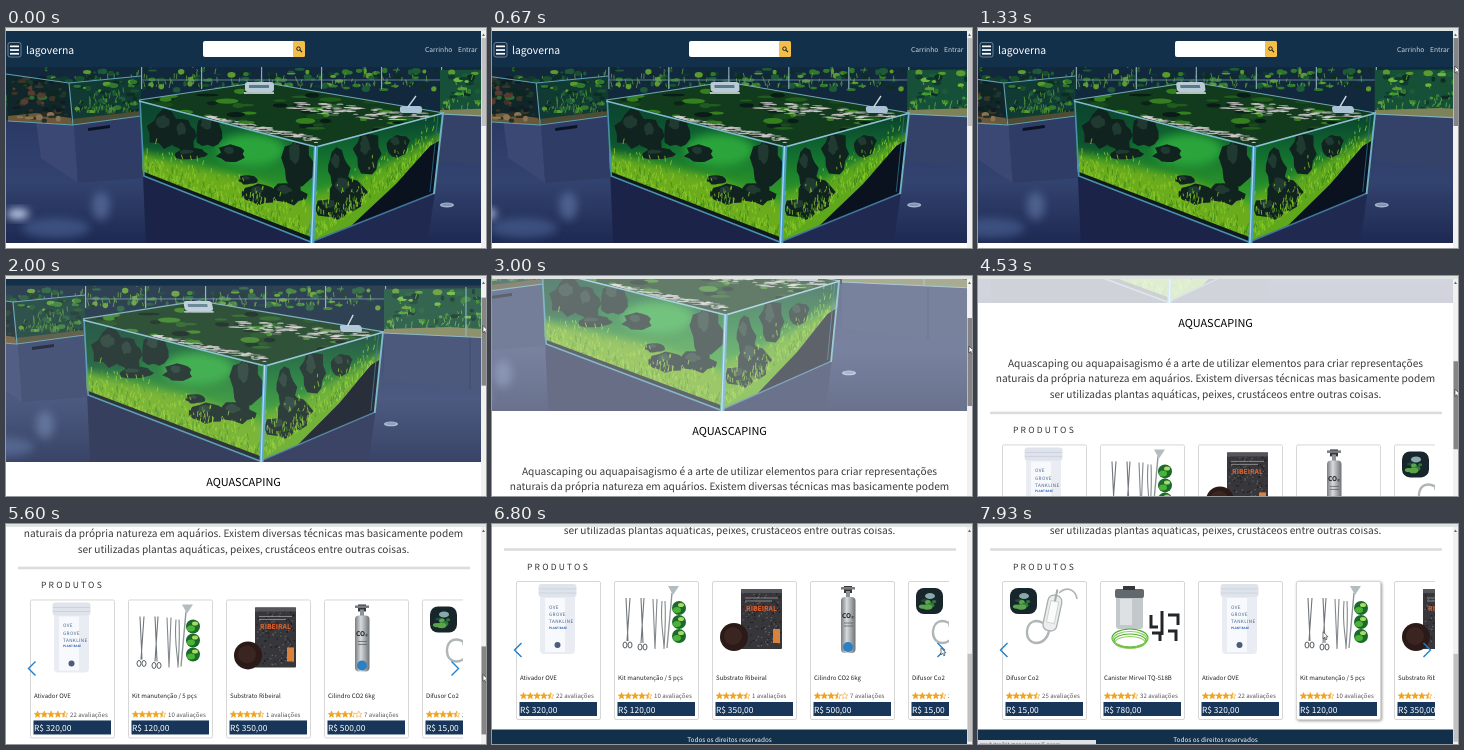
Write an HTML page that moves like this. It is 480 px wide and 220 px high and loops after 8 s.

```html
<!DOCTYPE html>
<html lang="pt">
<head>
<meta charset="utf-8">
<title>lagoverna</title>
<style>
html, body { margin: 0; width: 100%; height: 100%; overflow: hidden; background: #fff; }
svg { display: block; }
text { font-family: "Noto Sans CJK JP", "Noto Sans CJK SC", "Noto Sans CJK", sans-serif; text-rendering: geometricPrecision; white-space: pre; }
</style>
</head>
<body>
<svg id="stage" width="480" height="220" viewBox="0 0 480 220"></svg>
<script>
const LOOP = 8000;
let seed = 11;
const rnd = (a = 0, b = 1) => {
  seed = (seed * 16807) % 2147483647;
  return a + (b - a) * seed / 2147483647;
};
const many = (n, make) => Array.from({ length: n }, (_, i) => make(i)).join('');

// Markup helpers
const rect = (x, y, w, h, fill, more = '') => `<rect x="${x}" y="${y}" width="${w}" height="${h}" fill="${fill}" ${more}/>`;
const oval = (x, y, rx, ry, fill, more = '') => `<ellipse cx="${x}" cy="${y}" rx="${rx}" ry="${ry}" fill="${fill}" ${more}/>`;
const poly = (points, fill, more = '') => `<polygon points="${points}" fill="${fill}" ${more}/>`;
const line = (d, stroke, width = 1, more = '') => `<path d="${d}" fill="none" stroke="${stroke}" stroke-width="${width}" ${more}/>`;
const text = (x, y, size, fill, str, more = '') => `<text x="${x}" y="${y}" font-size="${size}" fill="${fill}" ${more}>${str}</text>`;
const centered = 'text-anchor="middle"';
const gradient = (id, ...colors) => `<linearGradient id="${id}" x2="0" y2="1">${colors.map((c, i) =>
  `<stop offset="${i / (colors.length - 1)}" stop-color="${c}"/>`).join('')}</linearGradient>`;
const clip = (id, shape) => `<clipPath id="${id}">${shape}</clipPath>`;

// Aquarium scenery
const rock = (x, y, w, h) => {
  const ring = (k, dx, dy) => Array.from({ length: 15 }, (_, i) => {
    const a = i / 15 * 2 * Math.PI, r = rnd(.36, .56) * k;
    return `${(x + dx + Math.cos(a) * w * r).toFixed(1)},${(y + dy + Math.sin(a) * h * r).toFixed(1)}`;
  }).join(' ');
  return poly(ring(1.05, 0, 0), '#10231f') + poly(ring(.4, -w * .1, -h * .2), '#2c4a3e', 'opacity=".6"');
};
const leaves = (n, x0, x1, y0, y1, colors, stretch = 1) => many(n, () =>
  oval(rnd(x0, x1).toFixed(1), rnd(y0, y1).toFixed(1), (rnd(1.5, 5) * stretch).toFixed(1), rnd(1, 3).toFixed(1), colors[Math.floor(rnd(0, colors.length))]));
const grass = (n, x0, x1, floor, depth, color) => {
  const d = many(n, () => {
    const x = rnd(x0, x1);
    return `M${x.toFixed(1)} ${(floor(x) - rnd() * rnd(0, depth)).toFixed(1)}l${rnd(-1.5, 1.5).toFixed(1)} ${rnd(-6, -2).toFixed(1)}`;
  });
  return line(d, color, .8);
};
const flecks = (n, x0, x1, y0, slope, spread) => many(n, () => {
  const x = rnd(x0, x1), y = y0 + (x - x0) * slope + rnd(-spread, spread);
  return oval(x.toFixed(1), y.toFixed(1), rnd(2, 7).toFixed(1), rnd(.3, .8).toFixed(1), '#ddd3d6', 'opacity=".8"');
});
const greens = ['#17502a', '#2f7a2a', '#5c9a30', '#0d2c22', '#1d5a38', '#0f3a30'];
const darks = ['#101c22', '#1b3a2a', '#0c2620', '#3a3524'];

const LEFT = '133,72 310,118 305,214 137,148';
const RIGHT = '310,118 438,85 429,165 305,214';
const TOP = '133,72 255,54 438,85 310,118';

const room = () =>
  rect(-60, 39, 760, 60, '#12283c') +
  rect(-60, 88, 760, 130, 'url(#floor)') +
  leaves(150, 40, 440, 41, 62, greens) +
  grass(120, 60, 440, () => 60, 22, '#5f9f3a') +
  many(6, i => rect(135 + i * 60, 39, 1.2, 22, '#86aab6')) +
  line('M120 52H440', '#6f97a4', .8) +
  poly('-60,62 28,66 30,92 -60,92', '#16323a') + leaves(30, -55, 24, 64, 86, greens) +
  poly('30,93 68,97 72,155 35,130', '#3a4873') +
  poly('68,97 135,88 137,150 72,155', '#2f3c66') +
  poly('82,100 104,97 104,100 82,103', '#0c1226') +
  poly('0,46 63,55 67,97 2,93', '#10262a') +
  leaves(50, 4, 58, 50, 86, darks) + leaves(10, 8, 56, 56, 76, ['#5a3b30', '#2f6a30']) +
  poly('2,88 30,85 65,90 67,97 2,93', '#6b5838') +
  leaves(12, 8, 60, 86, 93, ['#2b2a26', '#8a7452', '#222f2a']) +
  poly('63,55 135,48 135,88 67,97', '#123a34') +
  leaves(55, 70, 132, 53, 84, greens) + grass(60, 70, 134, () => 86, 26, '#4f9434') +
  poly('66,91 135,83 135,88 67,97', '#4d4c35') +
  line('M0 46L63 55L135 48M63 55L67 97L135 88M67 97L2 93', '#5fa0b4', 1.1) +
  oval(12, 186, 11, 5, '#c9d8f6', 'filter="url(#soft)"') + oval(95, 178, 9, 14, '#7188b8', 'opacity=".5" filter="url(#soft)"') +
  oval(50, 200, 34, 10, '#5570a6', 'opacity=".5" filter="url(#soft)"') +
  poly('434,86 690,98 690,162 434,133', '#34426a') +
  line('M520 90V143M600 94V151', '#26325a') +
  poly('434,42 690,40 690,98 434,86', '#175038') +
  leaves(140, 438, 680, 44, 84, [...greens, '#3f9a2e', '#6cb53a']) +
  grass(180, 438, 680, () => 84, 36, '#63b03a') +
  poly('434,82 500,80 690,92 690,98 434,86', '#7d8258') +
  line('M434 86L690 98M516 40V89', '#7fb0c0', 1.1) +
  oval(441, 177, 7, 2.4, '#a5b4d0') + oval(441, 176.7, 5, 1.3, '#8491b0');

const leftFloor = x => 148 + (x - 137) * .393;
const leftFace = () =>
  poly('137,147 305,213 305,217 140,217', '#1b2448') +
  `<g clip-path="url(#leftClip)">` + poly(LEFT, 'url(#water)') +
  oval(245, 122, 34, 16, '#2aa53a', 'filter="url(#soft)"') +
  poly('120,70 190,88 186,124 120,125', '#0c4432', 'opacity=".6" filter="url(#soft)"') +
  poly('120,122 180,136 240,150 320,182 320,240 120,160', '#6aac1c', 'filter="url(#soft)"') +
  rock(160, 102, 36, 38) + rock(178, 108, 26, 34) + rock(203, 103, 28, 36) + rock(184, 126, 34, 12) +
  rock(226, 126, 28, 18) + rock(292, 136, 30, 54) + rock(282, 166, 36, 22) + rock(254, 166, 34, 20) + rock(242, 152, 18, 10) +
  grass(300, 136, 308, leftFloor, 42, '#8cc82a') + grass(130, 136, 308, leftFloor, 34, '#3f8a1c') +
  poly('133,142 305,209 305,214 137,148', '#0f1a1e') + `</g>` +
  line('M134 72L138 148L305 214', '#4a8fae', 1.6) + line('M133 73L310 119', '#7fbccb', 1.6);

const rightFloor = x => 214 - (x - 305) * .7;
const rightFace = () =>
  poly('305,213 429,164 421,217 305,217', '#202a50') +
  `<g clip-path="url(#rightClip)">` + poly(RIGHT, 'url(#water)') +
  poly('295,172 350,152 440,104 440,170 300,225', '#5fa81c', 'filter="url(#soft)"') +
  rock(362, 126, 28, 46) + rock(332, 140, 24, 36) + rock(340, 164, 40, 36) + rock(326, 180, 30, 22) + rock(392, 118, 24, 24) +
  grass(200, 308, 434, rightFloor, 46, '#8ccb2c') + grass(80, 308, 434, rightFloor, 40, '#3a841e') +
  poly('300,218 345,198 390,156 424,118 445,106 440,170', '#0a1220') + `</g>` +
  line('M305 214L429 165', '#41759a', 1.4) + line('M310 119L438 85', '#8cc4d2', 1.6) +
  line('M437 85L428 166', '#6fb0c8', 2) + line('M432 88L424 164', '#2f6d8c', .8) +
  line('M310 118L306 216', '#4a9cc4', 4.5) + line('M309.500 118L305.500 216', '#a9d8e8', 1.3);

const topFace = () =>
  `<g clip-path="url(#topClip)">` + poly(TOP, '#123a1c') +
  leaves(70, 150, 400, 58, 104, ['#205c1e', '#0c2418', '#34801f', '#0a1c18', '#184a1c'], 2.4) +
  flecks(95, 285, 425, 77, .1, 6) + flecks(80, 200, 315, 90, .2, 3) + `</g>` +
  line('M133 72L255 54L438 85', '#6fa8b8', 1.2) +
  rect(239, 54, 29, 10, '#b9cbd6', 'rx="3"') + rect(243, 57, 20, 3, '#587a8c') + line('M238 65H268', '#e8f0f3', 1.3) +
  rect(394, 78, 22, 7, '#a9c2d6', 'rx="2.500"') + line('M402 79L410 68', '#c9dbe4', 1.3);

// Product pictures, in card coordinates
const jar = () =>
  rect(24, 12, 35, 61, '#e9ecf3', 'rx="4"') + rect(29, 17, 20, 54, '#f8f9fc') +
  rect(22.500, 3, 38, 13, '#dfe3eb', 'rx="3"') + line('M23 8H60M23 12H60', '#c6ccd8', .7) +
  ['OVE', 'GROVE', 'TANKLINE'].map((w, i) => text(33, 28 + i * 7.2, 4.6, '#44638c', w, 'letter-spacing=".4"')).join('') +
  text(33, 48, 3, '#2c5fb0', 'PLANT BASE', 'font-weight="700"') + oval(41.500, 64, 3, 3, '#4d5c78');
const greenDisc = y => oval(65, y, 7, 7, '#1c6a2b') + oval(63, y + 2, 4, 3, '#49b436') + oval(67, y - 3, 3, 2, '#a5dc62');
const tools = () =>
  line('M12 17L14 60M16 17L13 60M27 17L29 62M30 17L27 62', '#70767c', 1.1) +
  [[11, 64], [16, 64], [26, 66], [31, 66]].map(([x, y]) => oval(x, y, 2, 3, 'none', 'stroke="#555b60"')).join('') +
  line('M39 18L41 68L43 18M48 20C46 45 50 55 50 68C51 50 52 40 51 20', '#82888d', 1.1) +
  line('M58 12L53 67', '#8f969b', 1.4) + poly('54,5 65,5 59,14', '#b5bcc0') +
  [27, 41, 55].map(greenDisc).join('');
const soil = () =>
  rect(29, 8, 41, 60, '#37373b', 'rx="1"') +
  many(150, () => oval(rnd(31, 69).toFixed(1), rnd(11, 66).toFixed(1), .8, .7, rnd() < .5 ? '#636268' : '#1d1c20')) +
  rect(29, 8, 41, 4, '#55565c') + line('M33 17H66M33 20H60', '#aaa', .7) +
  text(49.500, 30, 6.8, '#e8632a', 'RIBEIRAL', centered + ' font-weight="700"') +
  rect(61, 48, 7, 14, '#d9823c') + oval(22, 56, 14, 14, '#2b1a17') + oval(21, 55, 9, 9, '#3a2520');
const cylinder = () =>
  rect(34, 5, 8, 7, '#35383c') + rect(31, 6, 14, 2.500, '#777c80') + rect(36, 10, 4, 8, '#8d9296') +
  rect(31, 16, 14.500, 56, 'url(#steel)', 'rx="4"') +
  text(38, 37, 6.5, '#222', 'CO₂', centered + ' font-weight="700"') +
  line('M34 42H43M34 45H43', '#555', .7) + oval(38, 66, 5, 5, '#2d7fc4');
const diffuser = () =>
  rect(8, 7, 27, 26, '#16262a', 'rx="8"') + leaves(8, 14, 29, 17, 28, ['#2d7a38', '#1f4d3a', '#5aa54a']) + oval(22, 15, 5, 3, '#88a9ad') +
  `<g transform="rotate(12 50 34)">` + rect(43, 14, 14, 36, '#eceeee', 'rx="6" stroke="#a7adae" stroke-width="1.300"') +
  rect(46, 20, 8, 22, '#fafafa', 'stroke="#c7cccc" stroke-width=".8"') + line('M50 8V20', '#a4aaab', 2) + `</g>` +
  line('M47 50C44 66 24 66 25 50C26 40 34 38 41 42', '#b0b6b7', 2.4) + line('M57 12C66 4 74 10 75 18', '#b0b6b7', 1.6);
const canister = () =>
  rect(16, 14, 27, 34, '#c3c8cb', 'rx="3"') + rect(20, 18, 12, 26, '#dde1e3') + rect(15, 8, 29, 9, '#62696e', 'rx="2"') + rect(23, 5, 12, 4, '#33383c') +
  many(4, i => oval(30, 57 + i * 1.5, 18 - i, 9 - i, 'none', `stroke="${i % 2 ? '#8fd15a' : '#4fae35'}" stroke-width="1.200"`)) +
  line('M51 34V46H58M62 30V54M68 34H78V44M52 52H60V60M68 50H76V60', '#22262a', 3);

const products = [
  ['Ativador OVE', jar, 4.5, 22, '320,00'],
  ['Kit manutenção / 5 pçs', tools, 4.5, 10, '120,00'],
  ['Substrato Ribeiral', soil, 4.5, 1, '350,00'],
  ['Cilindro CO2 6kg', cylinder, 3.5, 7, '500,00'],
  ['Difusor Co2', diffuser, 4.5, 25, '15,00'],
  ['Canister Mirvel TQ-518B', canister, 4.5, 32, '780,00']
];
const starPoints = (x, y) => Array.from({ length: 10 }, (_, i) => {
  const r = i % 2 ? 1.5 : 3.5, a = (i / 5 - .5) * Math.PI;
  return `${(x + r * Math.cos(a)).toFixed(2)},${(y + r * Math.sin(a)).toFixed(2)}`;
});
const star = (i, rating) => {
  const points = starPoints(7.5 + i * 6.8, 115), full = rating >= i + 1;
  return poly(points.join(' '), full ? '#f2a31b' : '#fff', 'stroke="#e79a17" stroke-width=".5"') +
    (!full && rating > i ? poly([points[0], ...points.slice(5)].join(' '), '#f2a31b') : '');
};
const card = i => {
  const [name, picture, rating, votes, price] = products[i % products.length];
  return `<g transform="translate(${24 + i * 98} 356.500)">` +
    rect(.5, .5, 84, 138, '#fff', `id="frame${i}" rx="1.500" stroke="#d6d6d6"`) + picture() +
    text(4, 99, 6.1, '#222', name) + many(5, k => star(k, rating)) +
    text(40, 117.2, 6.1, '#555', votes + ' avaliações') +
    rect(3.5, 121, 77.500, 14, '#17365a') + text(4, 131.500, 8.4, '#fff', 'R$ ' + price, 'font-weight="500"') + `</g>`;
};

const paragraph = [
  'Aquascaping ou aquapaisagismo é a arte de utilizar elementos para criar representações',
  'naturais da própria natureza em aquários. Existem diversas técnicas mas basicamente podem',
  'ser utilizadas plantas aquáticas, peixes, crustáceos entre outras coisas.'
];
const header = () =>
  rect(0, 0, 475, 39, '#13304b') +
  rect(2, 14.500, 13, 14.500, 'none', 'rx="2" stroke="#8299a8" stroke-width=".8"') + many(3, i => rect(4, 17.5 + i * 3.7, 9, 1.700, '#fff')) +
  text(20, 25.500, 10.4, '#fff', 'lagoverna', 'font-weight="500"') +
  rect(197, 13, 92, 16, '#fff', 'rx="2"') + rect(287, 13, 12, 16, '#f3bf48', 'rx="1.500"') +
  oval(292.500, 20.700, 1.8, 1.8, 'none', 'stroke="#222"') + line('M294 22.200L296 24.200', '#222', 1.2) +
  text(419, 24.300, 6.7, '#c8d4dc', 'Carrinho') + text(452, 24.300, 6.7, '#c8d4dc', 'Entrar');

const stage = document.getElementById('stage');
stage.innerHTML = `<defs>` +
  gradient('floor', '#2a3864', '#33436f', '#1c2850') + gradient('water', '#0a4030', '#12702f', '#2f9a2a', '#6cae1e') +
  `<linearGradient id="steel"><stop stop-color="#777c80"/><stop offset=".4" stop-color="#d8dbdd"/><stop offset="1" stop-color="#6c7175"/></linearGradient>` +
  `<filter id="soft" x="-50%" y="-50%" width="200%" height="200%"><feGaussianBlur stdDeviation="4"/></filter>` +
  clip('leftClip', poly(LEFT)) + clip('rightClip', poly(RIGHT)) + clip('topClip', poly(TOP)) +
  clip('heroClip', rect(0, 39, 475, 176)) + clip('listClip', rect(23, 350, 434, 150)) + `</defs>` +
  rect(0, 0, 480, 220, '#fff') +
  `<g id="page">` + header() +
  `<g id="hero" clip-path="url(#heroClip)"><g id="room">${room()}</g><g id="top">${topFace()}</g>` +
  `<g id="left">${leftFace()}</g><g id="right">${rightFace()}</g></g>` +
  text(237.500, 239, 10.95, '#000', 'AQUASCAPING', centered + ' font-weight="500"') +
  paragraph.map((s, i) => text(237.5, 278.7 + i * 15.5, 10.15, '#3a3a3a', s, centered)).join('') +
  rect(12, 323.700, 452, 2.600, '#dcdcdc') +
  text(35, 345.300, 8.5, '#333', 'PRODUTOS', 'letter-spacing="2.200"') +
  `<g clip-path="url(#listClip)"><g id="track">${many(10, card)}</g></g>` +
  line('M29.500 418.500L22.500 425.500L29.500 432.500M445.500 418.500L452.500 425.500L445.500 432.500', '#1f7fd0', 1.4) +
  rect(0, 505, 475, 40, '#13304b') + text(237.500, 517.300, 6.4, '#fff', 'Todos os direitos reservados', centered) + `</g>` +
  rect(0, 0, 480, 3, '#dfe4e2') + rect(475, 3, 5, 217, '#f1f1f1') + poly('476,8 479,8 477.500,5.500', '#666') +
  rect(475.500, 10, 4.500, 88, '#c1c1c1', 'id="thumb"') +
  `<g id="status">` + rect(0, 216, 118, 4, '#dfe3e8') + text(2, 221.500, 5, '#555', 'produtos/kit-manutencao/5-pecas') + `</g>` +
  poly('0,0 0,7 1.700,5.500 2.800,8 4,7.400 2.900,5 5,5', '#fff', 'id="cursor" stroke="#222" stroke-width=".6"');

// Motion
const part = id => document.getElementById(id);
const ease = u => u * u * (3 - 2 * u);
const track = (keys, t, curve = u => u) => {
  if (t <= keys[0][0]) return keys[0][1];
  for (let i = 1; i < keys.length; i++) {
    const [t0, v0] = keys[i - 1], [t1, v1] = keys[i];
    if (t < t1) return v0 + (v1 - v0) * curve((t - t0) / (t1 - t0));
  }
  return keys[keys.length - 1][1];
};
const scrollKeys = [[1760, 0], [2000, 29], [3000, 80], [4530, 188], [5600, 281], [6200, 299.5]];
const slideKeys = [[6850, 0], [7450, -392]];
const cursorX = [[900, 484], [1200, 477], [6300, 477], [6800, 449], [7100, 449], [7700, 345]];
const cursorY = [[6300, 0], [6800, -34], [7100, -34], [7700, -50]];
const move = (id, x, y) => part(id).setAttribute('transform', `translate(${x} ${y})`);
const matrix = (id, a, c, e) => part(id).setAttribute('transform', `matrix(${a} 0 ${c} 1 ${e} 0)`);

// Corner speeds in px/s differ, so each face narrows or shears as the view pans
const SPEED = { left: 28, front: 25.4, right: 30 };
const stretch = (id, x0, x1, v0, v1, s) => {
  const a = 1 - (v1 - v0) * s / (x1 - x0);
  matrix(id, a, 0, x0 - v0 * s - a * x0);
};

function draw(t) {
  const s = t / 1000, scroll = track(scrollKeys, t);
  move('page', 0, -scroll);
  move('room', -28 * s, 0);
  stretch('left', 133, 310, SPEED.left, SPEED.front, s);
  stretch('right', 310, 438, SPEED.front, SPEED.right, s);
  matrix('top', 1 - .0108 * s, .0981 * s, -33.63 * s);
  part('hero').setAttribute('opacity', Math.max(0, 1 - scroll / 235));
  move('track', track(slideKeys, t, ease), 0);
  move('thumb', 0, scroll * .4);
  part('thumb').setAttribute('fill', t > 1200 && t < 6300 ? '#858585' : '#c1c1c1');
  move('cursor', track(cursorX, t, ease), 38 + scroll * .4 + track(cursorY, t, ease));
  const hover = t > 7550;
  part('status').setAttribute('visibility', hover ? 'visible' : 'hidden');
  part('frame7').style.filter = hover ? 'drop-shadow(1px 1px 1.5px #999)' : 'none';
}
function tick() {
  draw(performance.now() % LOOP);
  requestAnimationFrame(tick);
}
tick();
</script>
</body>
</html>
```
